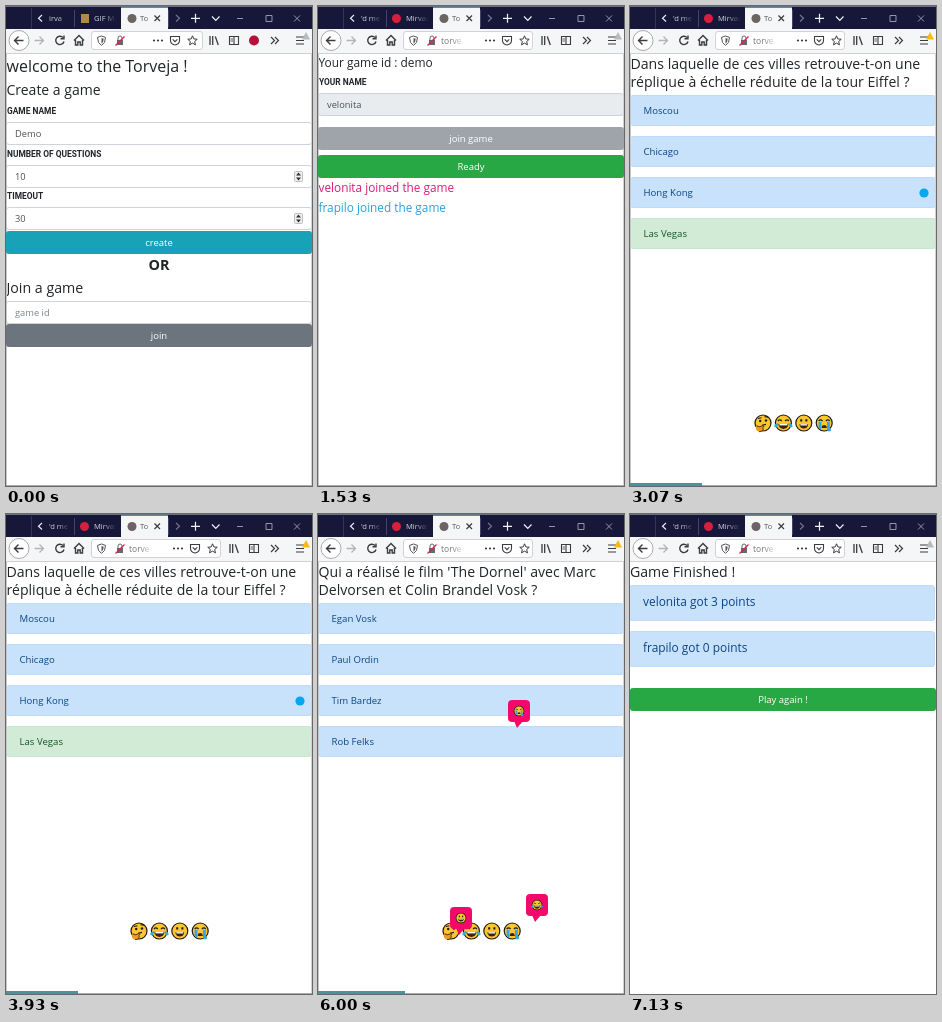
An HTML page with a canvas that plays this animation: 306x480 px, repeating every 7.67 s.

```html
<!DOCTYPE html>
<html lang="en">
<head>
<meta charset="utf-8">
<title>Quiz game</title>
<style>
  html, body { margin: 0; width: 100%; height: 100%; overflow: hidden; background: #fff; }
  canvas { display: block; }
</style>
</head>
<body>
<canvas id="stage" width="306" height="480"></canvas>
<script>
const ctx = document.getElementById('stage').getContext('2d');
const LOOP = 7670;
const FONT = '"Open Sans", "Noto Sans", sans-serif';
const LABEL_FONT = 'Roboto, sans-serif';
const INK = '#212529', ICON = '#3c3c40', BAR = '#f5f6f7', NAVY = '#17173a';

function text(str, x, y, size, color = INK, { bold = false, align = 'left', font = FONT } = {}) {
  ctx.font = `${bold ? 'bold ' : ''}${size}px ${font}`;
  ctx.textAlign = align;
  ctx.fillStyle = color;
  ctx.fillText(str, x, y);
}

function rect(x, y, w, h, color) {
  ctx.fillStyle = color;
  ctx.fillRect(x, y, w, h);
}

function box(x, y, w, h, fill, border, radius = 2.5) {
  ctx.beginPath();
  ctx.roundRect(x + .5, y + .5, w - 1, h - 1, radius);
  ctx.fillStyle = fill;
  ctx.fill();
  ctx.strokeStyle = border;
  ctx.lineWidth = 1;
  ctx.stroke();
}

function disc(x, y, r, color) {
  ctx.beginPath();
  ctx.arc(x, y, r, 0, 7);
  ctx.fillStyle = color;
  ctx.fill();
}

function stroke(path, color = ICON, width = 1.2) {
  ctx.strokeStyle = color;
  ctx.lineWidth = width;
  ctx.stroke(new Path2D(path));
}

function fill(path, color) {
  ctx.fillStyle = color;
  ctx.fill(new Path2D(path));
}

function at(x, y, draw, scale = 1) {
  ctx.save();
  ctx.translate(x, y);
  ctx.scale(scale, scale);
  draw();
  ctx.restore();
}

// Text that dissolves into its background at the right edge.
function fadedText(str, x, y, width, color, bg, size = 7.6) {
  ctx.save();
  ctx.beginPath();
  ctx.rect(x, y - 10, width, 14);
  ctx.clip();
  text(str, x, y, size, color);
  const fade = ctx.createLinearGradient(x, 0, x + width, 0);
  fade.addColorStop(.45, bg + '00');
  fade.addColorStop(1, bg);
  rect(x, y - 10, width, 14, fade);
  ctx.restore();
}

function tabs(early) {
  rect(0, 0, 306, 23, NAVY);
  rect(0, 0, 306, 1, '#6b7282');
  rect(25, 2, 1, 21, '#34345a');
  rect(68, 4, 1, 17, '#44446a');
  rect(162, 4, 1, 17, '#44446a');
  stroke('M36 9 L32.5 12.2 L36 15.5', '#e8e8f0');
  fadedText(early ? 'irva' : "'d me", 43, 15, 20, '#d4d4de', NAVY);
  if (early) rect(75, 8, 8, 9, '#b08a4a');
  else disc(78.5, 12.5, 4.5, '#d81e3e');
  fadedText(early ? 'GIF Ma' : 'Mirvan', 88, 15, 22, '#d4d4de', NAVY);

  rect(115, 1, 47, 22, BAR);
  rect(115, 1, 47, 1, '#3a8ee6');
  disc(126, 12.5, 4.5, '#6b6462');
  fadedText('To', 134, 15, 13, '#505055', BAR);
  stroke('M148.5 9.5 l5.5 5.5 m0 -5.5 l-5.5 5.5');

  stroke('M170 9 L173.5 12.2 L170 15.5', '#74748c');
  stroke('M185 12.3 h9 m-4.5 -4.5 v9', '#f2f2f6');
  stroke('M206 10.5 L209.8 14.3 L213.5 10.5', '#f2f2f6');
  stroke('M231 12.5 h6 M260 9.5 h6 v6 h-6 z M288 9.5 l6 6 m0 -6 l-6 6', '#a4a4b6', .9);
}

function star(x, y) {
  ctx.beginPath();
  for (let i = 0; i < 10; i++) {
    const r = i % 2 ? 2.3 : 5, a = i * Math.PI / 5 - Math.PI / 2;
    ctx.lineTo(x + r * Math.cos(a), y + r * Math.sin(a));
  }
  ctx.closePath();
  ctx.strokeStyle = ICON;
  ctx.lineWidth = 1;
  ctx.stroke();
}

function toolbar(early, alert) {
  rect(0, 23, 306, 25, BAR);
  rect(0, 47, 306, 1, '#d0d0d4');

  ctx.beginPath();
  ctx.arc(13, 34.5, 10, 0, 7);
  ctx.fillStyle = '#fff';
  ctx.fill();
  ctx.strokeStyle = '#a9a9ae';
  ctx.lineWidth = 1;
  ctx.stroke();
  stroke('M17.5 34.5 H8.5 m4 -4 l-4 4 l4 4', ICON, 1.4);
  stroke('M28.5 34.5 H37.5 m-4 -4 l4 4 l-4 4', '#b4b4b8', 1.3);
  stroke('M57 31.5 A4.2 4.2 0 1 0 58 35.5 M58 29.5 v3.2 h-3.5', ICON, 1.4);
  stroke('M68 34.5 L73 29.5 L78 34.5 M69.5 34 v5 h2.3 v-3 h2.4 v3 h2.3 v-5', ICON, 1.4);

  const right = early ? 197 : 215;
  box(85, 25, right - 85, 19, '#fff', '#d2d2d7');
  stroke('M95.5 30 l4 1.4 q0 6 -4 8 q-4 -2 -4 -8 z', '#55555a', 1);
  fill('M95.5 32 l2.2 .8 q0 3.6 -2.2 4.8 z', '#55555a');
  rect(111, 34, 6, 5, '#66666c');
  stroke('M112 34 v-2 a2 2 0 0 1 4 0 v2', '#66666c', 1);
  stroke('M109.5 39.5 l9 -9', '#d7264c', 1.3);
  if (!early) fadedText('torve', 123, 38, 24, '#77777c', '#ffffff', 8.5);

  const shift = early ? -20 : 0;
  for (let i = -1; i < 2; i++) disc(172 + shift + i * 4, 34.5, 1.1, ICON);
  at(189 + shift, 34.5, () =>
    stroke('M-4.5 -4 h9 v4 a4.5 4.5 0 0 1 -9 0 z M-2.3 -1.2 L0 1.2 L2.3 -1.2', ICON, 1.1));
  star(206.5 + shift, 34.8);
  at(228 + (early ? -20 : 0) + (early ? 20 : 0), 34.5, () => {});
  at(228 + shift * 0, 34.5, () => stroke('M0 0', ICON));
  library(early ? 208 : 228);
  sidebar(early ? 228 : 248);
  if (early) disc(248, 34.5, 5, '#b5123a');
  stroke('M265 31 l3.5 3.5 l-3.5 3.5 m4 -7 l3.5 3.5 l-3.5 3.5');
  stroke('M290 31 h8 m-8 3.5 h8 m-8 3.5 h8', ICON, 1.2);
  fill('M300 26 L304 33.5 H296 z', alert ? '#fbb910' : '#b9b9be');
}

function library(x) {
  at(x, 34.5, () => stroke('M-4 -4.5 v9 M-1.3 -4.5 v9 M1.3 -4 l3 8.5', ICON, 1.3));
}

function sidebar(x) {
  at(x, 34.5, () => {
    stroke('M-4.5 -4 h9 v8 h-9 z M0 -4 v8', ICON, 1.1);
    stroke('M-3.5 -1.5 h2.5 m-2.5 2 h2.5', ICON, .8);
  });
}

function page(early, alert) {
  rect(0, 0, 306, 480, '#fff');
  tabs(early);
  toolbar(early, alert);
}

function frame() {
  rect(0, 48, 1, 432, '#c6c8cc');
  rect(305, 48, 1, 432, '#d0d2d5');
  rect(0, 479, 306, 1, '#a8acb0');
}

function button(label, y, color) {
  box(0, y, 306, 23, color, color, 2);
  text(label, 153, y + 15, 9.5, '#fff', { align: 'center' });
}

function field(value, y, { color = '#495057', bg = '#fff', spinner = false } = {}) {
  box(0, y, 306, 23, bg, '#ced4da');
  text(value, 9, y + 15.2, 9.3, color);
  if (!spinner) return;
  box(288, y + 6, 9, 11, '#eeeeef', '#bfbfc3', 1);
  fill(`M290 ${y + 10.5} l2.5 -3 l2.5 3 z M290 ${y + 12.5} l2.5 3 l2.5 -3 z`, '#303034');
}

const label = (str, y) => text(str, 1, y, 8.4, INK, { bold: true, font: LABEL_FONT });

function option(str, y, correct) {
  if (correct) box(0, y, 306, 31, '#d1ebd7', '#c8e7cf');
  else box(0, y, 306, 31, '#c9e2fc', '#bddbfa');
  text(str, 13.5, y + 19, 9.6, correct ? '#155724' : '#0a4584');
}

function face(x, y, kind, scale = 1) {
  at(x, y, () => {
    disc(0, 0, 8.6, '#1d1a14');
    disc(0, 0, 7.4, '#fcc62d');
    if (kind === 'think') {
      disc(-2.8, -2, 1.2, '#221c10');
      disc(3, -2.5, 1.2, '#221c10');
      stroke('M-5 -4.5 l3.5 -.8 M1.5 -6 q2 -1 4 .8 M-1 2.2 l4 -.8', '#221c10', 1.1);
      fill('M-7 3 q2 -1 3 1 l4 -1.5 q2 .5 0 2 q1 4 -4 4.2 q-4 -1 -3 -5.7 z', '#f09a20');
      stroke('M-6.5 3 q2 -.5 2.5 1 l4 -1.5 q2 .5 0 2 q1 4 -4 4.2', '#221c10', .8);
    } else if (kind === 'smile') {
      stroke('M-2.6 -3.8 v2.4 M2.6 -3.8 v2.4', '#221c10', 2);
      fill('M-4.4 1.2 H4.4 A4.4 4.4 0 0 1 -4.4 1.2 z', '#3a2412');
      rect(-3.4, 1.2, 6.8, 1.3, '#fff');
    } else {
      stroke('M-5.5 -2 q2 -2.2 3.8 0 M1.7 -2 q2 -2.2 3.8 0', '#221c10', 1.2);
      if (kind === 'joy') {
        fill('M-5 1 H5 A5 5 0 0 1 -5 1 z', '#3a2412');
        rect(-4, 1, 8, 1.4, '#fff');
        fill('M-5 0 q-5 1 -4 4 q3 1.5 4 -4 z M5 0 q5 1 4 4 q-3 1.5 -4 -4 z', '#2ea8e8');
      } else {
        fill('M-2.6 5 a2.6 3 0 0 1 5.2 0 z', '#3a2412');
        fill('M-5.6 -1 h2.8 v7 q-2 .5 -2.8 -1 z M2.8 -1 h2.8 v6 q3 3 -.5 3.5 q-2.6 0 -2.3 -3 z', '#2ea8e8');
      }
    }
  }, scale);
}

function reactions() {
  ['think', 'joy', 'smile', 'cry'].forEach((kind, i) => face(133 + i * 20.4, 417, kind));
}

function bubble(x, y, kind) {
  const pink = '#f5086c';
  box(x, y, 22, 22, pink, pink, 3);
  fill(`M${x + 6} ${y + 21} h9 l-6 7 z`, pink);
  face(x + 11, y + 11, kind, .62);
}

function question(lines, answers, correct, progress) {
  page(false, true);
  lines.forEach((line, i) => text(line, 0.5, 63 + i * 18, 14.1));
  answers.forEach((answer, i) => option(answer, 89 + i * 41, i === correct));
  reactions();
  frame();
  rect(0, 477, progress, 3, '#4b939c');
}

function home() {
  page(true, false);
  text('welcome to the Torveja !', 0.5, 65.5, 16);
  text('Create a game', 0.5, 89, 14);
  label('GAME NAME', 108);
  field('Demo', 116);
  label('NUMBER OF QUESTIONS', 151);
  field('10', 159, { spinner: true });
  label('TIMEOUT', 193);
  field('30', 201, { spinner: true });
  text('OR', 153, 264, 14.4, INK, { bold: true, align: 'center' });
  text('Join a game', 0.5, 286.5, 14.2);
  field('game id', 295, { color: '#7b848c' });
  frame();
  button('create', 225, '#17a2b8');
  button('join', 318, '#6c757d');
}

function lobby() {
  page(false, false);
  text('Your game id : demo', 0.5, 61, 11.9);
  label('YOUR NAME', 79);
  field('velonita', 87, { bg: '#e9ecef' });
  text('velonita joined the game', 0.5, 185.5, 11.8, '#dc1a78');
  text('frapilo joined the game', 0.5, 205.5, 11.8, '#27a3d8');
  frame();
  button('join game', 121, '#9fa4aa');
  button('Ready', 149, '#28a745');
}

function towerQuestion() {
  question(
    ['Dans laquelle de ces villes retrouve-t-on une', 'réplique à échelle réduite de la tour Eiffel ?'],
    ['Moscou', 'Chicago', 'Hong Kong', 'Las Vegas'], 3, 72);
  disc(294, 187, 4.6, '#08a6ee');
}

function filmQuestion() {
  question(
    ["Qui a réalisé le film 'The Dornel' avec Marc", 'Delvorsen et Colin Brandel Vosk ?'],
    ['Egan Vosk', 'Paul Ordin', 'Tim Bardez', 'Rob Felks'], -1, 87);
  bubble(190, 186, 'cry');
  bubble(208, 380, 'joy');
  bubble(132, 393, 'smile');
}

function results() {
  page(false, false);
  text('Game Finished !', 0, 63, 14.1);
  ['velonita got 3 points', 'frapilo got 0 points'].forEach((line, i) => {
    box(-1, 71 + i * 46, 306, 36, '#c9e2fc', '#bddbfa');
    text(line, 13, 91.5 + i * 46, 11.9, '#0a4584');
  });
  button('Play again !', 174, '#28a745');
}

const scenes = [[6130, results], [4600, filmQuestion], [3070, towerQuestion], [1530, lobby], [0, home]];
const start = performance.now();

function tick() {
  const time = (performance.now() - start) % LOOP;
  scenes.find(([from]) => time >= from)[1]();
  requestAnimationFrame(tick);
}
tick();
</script>
</body>
</html>
```
